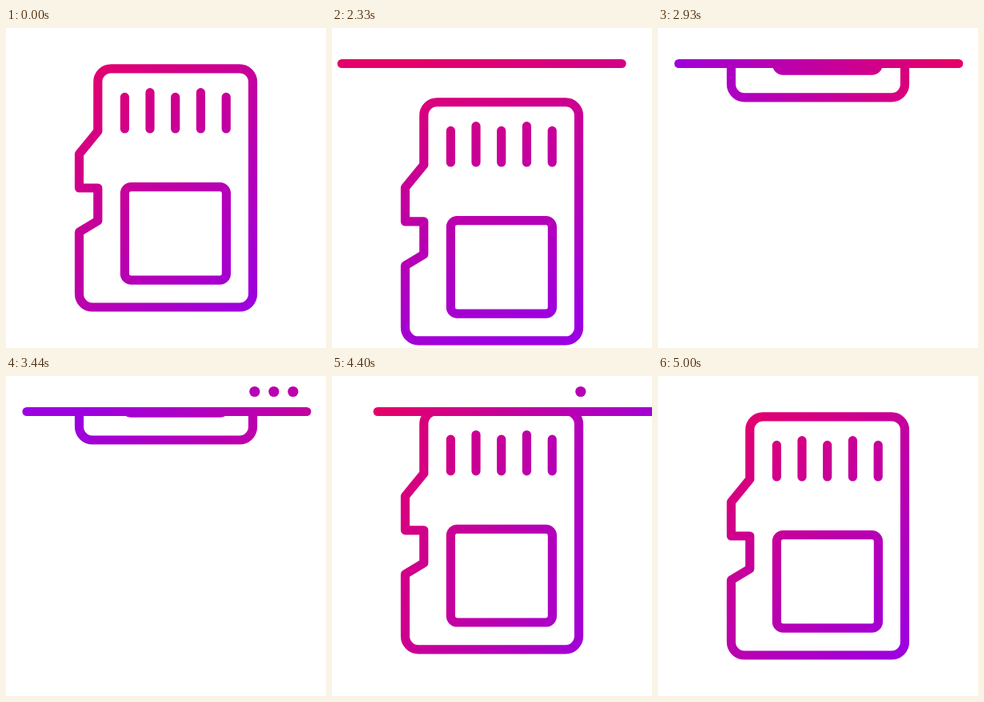
An HTML page that plays this animation: 400x400 px, repeating every 5030 ms.

```html
<!DOCTYPE html>
<html lang="en">
<head>
<meta charset="utf-8">
<title>Memory card</title>
<style>
  html, body { margin: 0; width: 100%; height: 100%; overflow: hidden; background: #fff; }
  svg { display: block; width: 100%; height: 100%; }
</style>
</head>
<body>
<svg viewBox="0 0 400 400">
  <defs>
    <linearGradient id="tint" gradientUnits="userSpaceOnUse" x1="20" y1="200" x2="380" y2="200">
      <stop offset="0" stop-color="#e4006a"/>
      <stop offset="1" stop-color="#9c00e0"/>
    </linearGradient>
    <clipPath id="belowSlot"><rect y="44" width="400" height="356"/></clipPath>
    <mask id="shapes" maskUnits="userSpaceOnUse" x="0" y="0" width="400" height="400">
      <g fill="none" stroke="#fff" stroke-width="11.2" stroke-linecap="round" stroke-linejoin="round">
        <g clip-path="url(#belowSlot)">
          <g id="card">
            <path d="M131.5 50.8H292a16.5 16.5 0 0 1 16.5 16.5V332.5a16.5 16.5 0 0 1-16.5 16.5H108a16.5 16.5 0 0 1-16.5-16.5V255L114.8 241V200H91.5V157.5L114.8 129V67.3a16.5 16.5 0 0 1 16.7-16.5Z"/>
            <rect x="148.4" y="198.6" width="127" height="116.6" rx="8"/>
            <path d="M148.4 86.4V126M180 80.7V126M211.7 86.4V126M243.4 80.7V126M275.2 86.4V126"/>
          </g>
        </g>
        <path id="slot" d="M26 44.5H375.8"/>
      </g>
      <g id="dots" fill="#fff">
        <circle cx="310.8" cy="19.5" r="6.6"/>
        <circle cx="334.8" cy="19.5" r="6.6"/>
        <circle cx="358.8" cy="19.5" r="6.6"/>
      </g>
    </mask>
  </defs>
  <rect width="400" height="400" fill="url(#tint)" mask="url(#shapes)"/>
</svg>
<script>
const LOOP = 5030;
const [tint, card, slot, dots] = ['tint', 'card', 'slot', 'dots'].map(id => document.getElementById(id));

// Bezier easing with flat ends; a and b are the horizontal handles.
const bezier = (a, b) => x => {
  let lo = 0, hi = 1;
  for (let i = 0; i < 24; i++) {
    const s = (lo + hi) / 2, r = 1 - s;
    if (3 * a * s * r * r + 3 * b * s * s * r + s ** 3 < x) lo = s; else hi = s;
  }
  return lo * lo * (3 - 2 * lo);
};
const inOut = bezier(.5, .5);
const smooth = bezier(.333, .667);
const settle = bezier(.3, .32);
const accelerate = x => x ** 4.1;

// Each step: [start, end, change, easing]
const travel = (t, base, steps) => steps.reduce((value, [start, end, change, ease]) => {
  const u = Math.min(1, Math.max(0, (t - start) / (end - start)));
  return value + change * (u <= 0 ? 0 : u >= 1 ? 1 : ease(u));
}, base);

const cardSteps = [
  [2000, 2430, 44.5, bezier(.33, .4)],
  [2430, 3000, -313.5, inOut],
  [4050, 4600, 299, bezier(.28, .33)],
  [4600, 5000, -30, inOut]
];
const slotSteps = [[2000, 2390, 390, inOut], [4050, 4700, 390, accelerate]];
const tintSteps = [[2000, 3440, 180, smooth], [3470, 5000, 180, settle]];
const dotTimes = [[3000, 4500], [3200, 4250], [3400, 4000]];

function draw(t) {
  card.setAttribute('transform', `translate(0 ${travel(t, 0, cardSteps)})`);
  slot.setAttribute('transform', `translate(${travel(t, -390, slotSteps)} 0)`);
  tint.setAttribute('gradientTransform', `rotate(${travel(t, 45, tintSteps)} 200 200)`);
  dotTimes.forEach(([on, off], i) => {
    dots.children[i].setAttribute('visibility', t >= on && t < off ? 'visible' : 'hidden');
  });
}

const origin = performance.now();
function tick() {
  draw((performance.now() - origin) % LOOP);
  requestAnimationFrame(tick);
}
tick();
</script>
</body>
</html>
```
